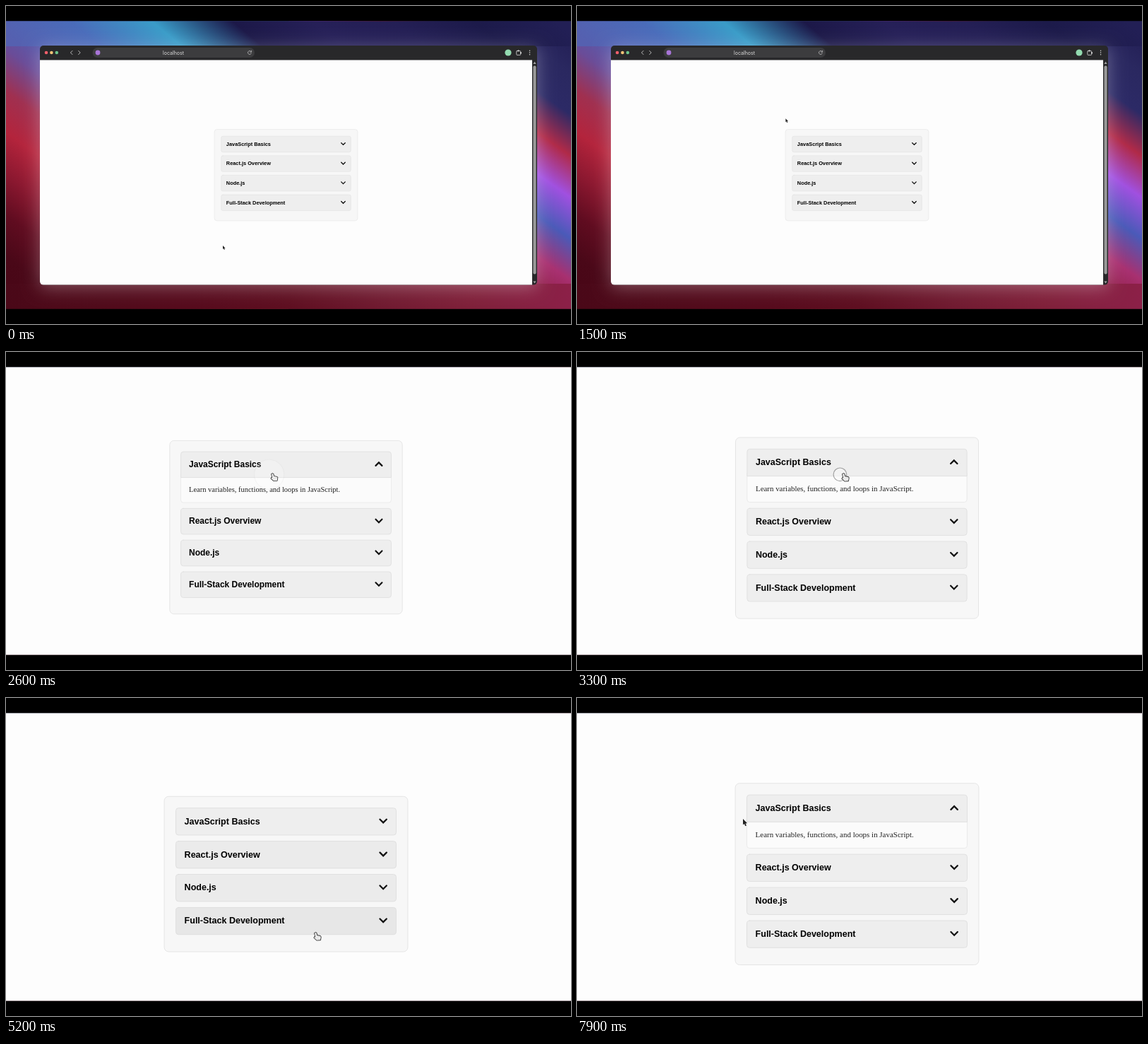
An HTML page with a canvas for the animation above (8 s loop, 800x450 px).

```html
<!DOCTYPE html>
<html lang="en">
<head>
<meta charset="utf-8">
<title>Accordion demo</title>
<style>
  html, body { margin: 0; width: 100%; height: 100%; overflow: hidden; background: #000; }
  canvas { display: block; }
</style>
</head>
<body>
<canvas id="stage" width="800" height="450"></canvas>
<script>
const c = document.getElementById('stage').getContext('2d');
const LOOP = 8000, STEP = 100;
const CX = 396.5, CY = 225;          // fixed point of the zoom
const PAGE_Y = 239.2, PX = 0.46;     // page centre and size of a page pixel at zoom 1
const ROW = 50, GAP = 10, BODY = 47.5, PAD = 21, HALF = 200;
const FADE = 300, CLICK_LAG = 150;

const items = [
  ['JavaScript Basics', 'Learn variables, functions, and loops in JavaScript.'],
  ['React.js Overview', 'Understand components, state, and props in React.'],
  ['Node.js', 'Build server-side applications with Node.js.'],
  ['Full-Stack Development', 'Combine frontend and backend in one project.']
];
const clicks = [
  { at: 2300, row: 0 }, { at: 3250, row: 0 }, { at: 4100, row: 1 },
  { at: 4800, row: 1 }, { at: 5480, row: 3 }, { at: 7400, row: 0 }
];
const start = [307, 339];
const moves = [
  { from: 0, to: 800, x: 160, y: 138 },
  { from: 800, to: 2000, x: 377, y: 172 },
  { from: 3600, to: 4100, x: 359, y: 219 },
  { from: 4900, to: 5200, x: 438, y: 332 },
  { from: 5200, to: 5450, x: 440, y: 311 },
  { from: 6500, to: 7150, x: 370, y: 157 },
  { from: 7500, to: 7900, x: 235, y: 171 }
];

const clamp = v => Math.max(0, Math.min(1, v));
const ease = u => u * u * (3 - 2 * u);

// State at time t

function zoomAt(t) {   // critically damped spring
  const s = Math.max(0, t - 1834) * .00493;
  return 1 + .7 * (1 - (1 + s) * Math.exp(-s));
}

function pointerAt(t) {
  return moves.reduce(([x, y], m) => {
    const e = ease(clamp((t - m.from) / (m.to - m.from)));
    return [x + (m.x - x) * e, y + (m.y - y) * e];
  }, start);
}

function openAt(t) {
  return clicks.filter(k => k.at + CLICK_LAG <= t)
    .reduce((open, k) => open === k.row ? -1 : k.row, -1);
}

function layout(open) {
  const height = 2 * PAD + items.length * (ROW + GAP) + (open < 0 ? 0 : BODY);
  const top = row => PAD - height / 2 + row * (ROW + GAP) + (open >= 0 && row > open ? BODY : 0);
  return { height, top };
}

function rowAt(t) {
  const z = zoomAt(t), [px, py] = pointerAt(t), { top } = layout(openAt(t));
  const x = (px - CX) / z / PX, y = ((py - CY) / z + CY - PAGE_Y) / PX;
  return Math.abs(x) > HALF ? -1 : items.findIndex((_, i) => y >= top(i) && y <= top(i) + ROW);
}

// Share of the last fade time the pointer spent on each row: a linear transition
function hoverAt(t) {
  const share = items.map(() => 0), samples = 15;
  for (let i = 0; i < samples; i++) {
    const row = rowAt(t - i * FADE / samples);
    if (row >= 0) share[row] += 1 / samples;
  }
  return share;
}

// Drawing helpers

function paint(fill, stroke, lw) {
  if (fill) { c.fillStyle = fill; c.fill(); }
  if (stroke) { c.strokeStyle = stroke; c.lineWidth = lw; c.stroke(); }
}

function box(x, y, w, h, r, fill, stroke, lw = 1) {
  c.beginPath();
  c.roundRect(x, y, w, h, r);
  paint(fill, stroke, lw);
}

function dot(x, y, r, fill, stroke, lw) {
  c.beginPath();
  c.arc(x, y, r, 0, 7);
  paint(fill, stroke, lw);
}

function shape(path, fill, stroke, lw) {
  const p = new Path2D(path);
  if (stroke) { c.strokeStyle = stroke; c.lineWidth = lw; c.stroke(p); }
  if (fill) { c.fillStyle = fill; c.fill(p); }
}

function chevron(x, y, w, h, color, lw) {
  shape(`M${x - w} ${y - h}L${x} ${y + h}L${x + w} ${y - h}`, null, color, lw);
}

function text(str, x, y, font, fill, align = 'left') {
  c.font = font;
  c.fillStyle = fill;
  c.textAlign = align;
  c.fillText(str, x, y);
}

// Evenly spaced colours across `span`, along the slanted normal (nx, ny)
function ramp(colors, x, y, nx, ny, span) {
  const k = span / (nx * nx + ny * ny);
  const g = c.createLinearGradient(x, y, x + nx * k, y + ny * k);
  colors.split(' ').forEach((col, i, all) => g.addColorStop(i / (all.length - 1), '#' + col));
  return g;
}

// Scene

function wallpaper() {
  c.fillStyle = ramp('4f60b4 6a4c98 a03050 b4243c 8c1830 600c20 4a0818 480616', 24, 20, -.7, 1, 410);
  c.fillRect(0, 0, 400, 450);
  c.fillStyle = ramp('221e54 2a2860 2c2a66 b02a48 a050e0 4a5ab8 a83070 8a1c40', 776, 20, -.7, 1, 410);
  c.fillRect(400, 0, 400, 450);
  c.fillStyle = ramp('5560b0 4a6cba 3a9cc8 1c1848 262058 241f55 1c1a4a 221f55', 0, 40, 1, -1.2, 800);
  c.fillRect(0, 0, 800, 57);
  c.fillStyle = ramp('4a0818 500a1a 560a1c 5e0e20 701a30 80203a 8c2048', 0, 410, 1, 0, 800);
  c.fillRect(0, 393, 800, 57);
}

function browser(z) {
  c.save();
  c.shadowColor = 'rgba(255,255,255,.3)';
  c.shadowBlur = 24 * z;
  c.shadowOffsetY = 4 * z;
  box(48, 56, 704, 338.6, 5, '#28282a');
  c.restore();

  c.save();
  c.beginPath();
  c.roundRect(48, 56, 704, 338.6, 5);
  c.clip();
  c.fillStyle = '#fdfdfd';
  c.fillRect(48, 76.5, 697, 319);

  ['#f25f6b', '#f5c376', '#6bc48a'].forEach((col, i) => dot(57 + i * 7.4, 66, 2.3, col));
  c.lineJoin = c.lineCap = 'round';
  shape('M94 63.4L91.4 66L94 68.6M102.6 63.4L105.2 66L102.6 68.6', null, '#ddd', .8);
  box(122.5, 59, 229.5, 14, 7, '#3c3c3e');
  dot(130, 66, 3.4, '#a874d8');
  text('localhost', 237, 68.5, '7px Inter, sans-serif', '#dcdcdc', 'center');
  c.beginPath();
  c.arc(345, 66, 2.5, .4, 5.5);
  paint(null, '#ccc', .7);
  shape('M347.6 63.2V65.2H345.6', null, '#ccc', .7);

  dot(711, 66, 4.6, '#93dbb0');
  box(722.8, 63.6, 5.8, 5.8, .8, null, '#ddd', .8);
  dot(725.6, 63.3, 1.1, '#ddd');
  dot(729, 66.4, 1.1, '#ddd');
  for (let i = -1; i < 2; i++) dot(741.5, 66 + i * 2.7, .75, '#ddd');

  box(746.4, 84.5, 4.2, 295, 2.1, '#9b9b9b');
  shape('M748.5 78.8l2.1 3.2h-4.2zM748.5 392.4l2.1 -3h-4.2z', '#a5a5a5');
  c.restore();
}

function accordion(t) {
  const open = openAt(t), hover = hoverAt(t), { height, top } = layout(open);
  c.save();
  c.translate(CX, PAGE_Y);
  c.scale(PX, PX);
  box(-220.5, -height / 2 + .5, 441, height - 1, 8, '#f7f7f7', '#dfdfdf');
  items.forEach(([title, body], row) => {
    const isOpen = row === open, y = top(row);
    if (isOpen) {
      box(.5 - HALF, y + 44, 2 * HALF - 1, 53, [0, 0, 5, 5], '#fbfbfb', '#e6e6e6');
      text(body, -184, y + 77, '14px "Liberation Serif", "Times New Roman", serif', '#222');
    }
    const g = Math.round(238 - (isOpen ? 0 : 17 * hover[row]));   // open headers ignore hover
    box(.5 - HALF, y + .5, 2 * HALF - 1, ROW - 1, isOpen ? [5, 5, 0, 0] : 5, `rgb(${g},${g},${g})`, '#dcdcdc');
    text(title, -184, y + 29.8, 'bold 16px "Liberation Sans", Arial, sans-serif', '#000');
    c.lineJoin = 'miter';
    c.lineCap = 'round';
    chevron(176, y + 24, 6, isOpen ? -3 : 3, '#111', 2.9);
  });
  c.restore();
}

function pointer(t, z) {
  c.save();
  c.translate(...pointerAt(t));
  c.scale(z, z);
  for (const { at } of clicks) {
    const age = t - at, a = 1 - age / 400;
    if (age < 0 || a <= 0) continue;
    dot(-2.7, .8, 4 + age * .03, `rgba(250,250,250,${.6 * a})`, `rgba(90,90,90,${.7 * a * a})`, .7);
  }
  c.lineJoin = 'round';
  if (rowAt(t) >= 0) {
    shape('M-.6 .4L.3 0L1 .6L1.3 2.3L4.1 2.9L4.6 3.6L4.2 6.1L1.2 6.3L-1 4.2L-.7 3.6L.1 3.9Z', '#e9e9e9', '#333', 1);
  } else {
    shape('M0 0V5L1.1 4.1L1.9 6L2.9 5.6L2.1 3.8L3.6 3.7Z', '#222', 'rgba(255,255,255,.8)', .6);
  }
  c.restore();
}

function draw(now) {
  const t = Math.floor(now % LOOP / STEP) * STEP, z = zoomAt(t);
  c.fillStyle = '#000';
  c.fillRect(0, 0, 800, 450);
  c.save();
  c.beginPath();
  c.rect(0, 21.6, 800, 406.8);
  c.clip();
  c.save();
  c.translate(CX, CY);
  c.scale(z, z);
  c.translate(-CX, -CY);
  wallpaper();
  browser(z);
  accordion(t);
  c.restore();
  pointer(t, z);
  c.restore();
}

const begin = performance.now();
function tick() {
  draw(performance.now() - begin);
  requestAnimationFrame(tick);
}
tick();
</script>
</body>
</html>
```
